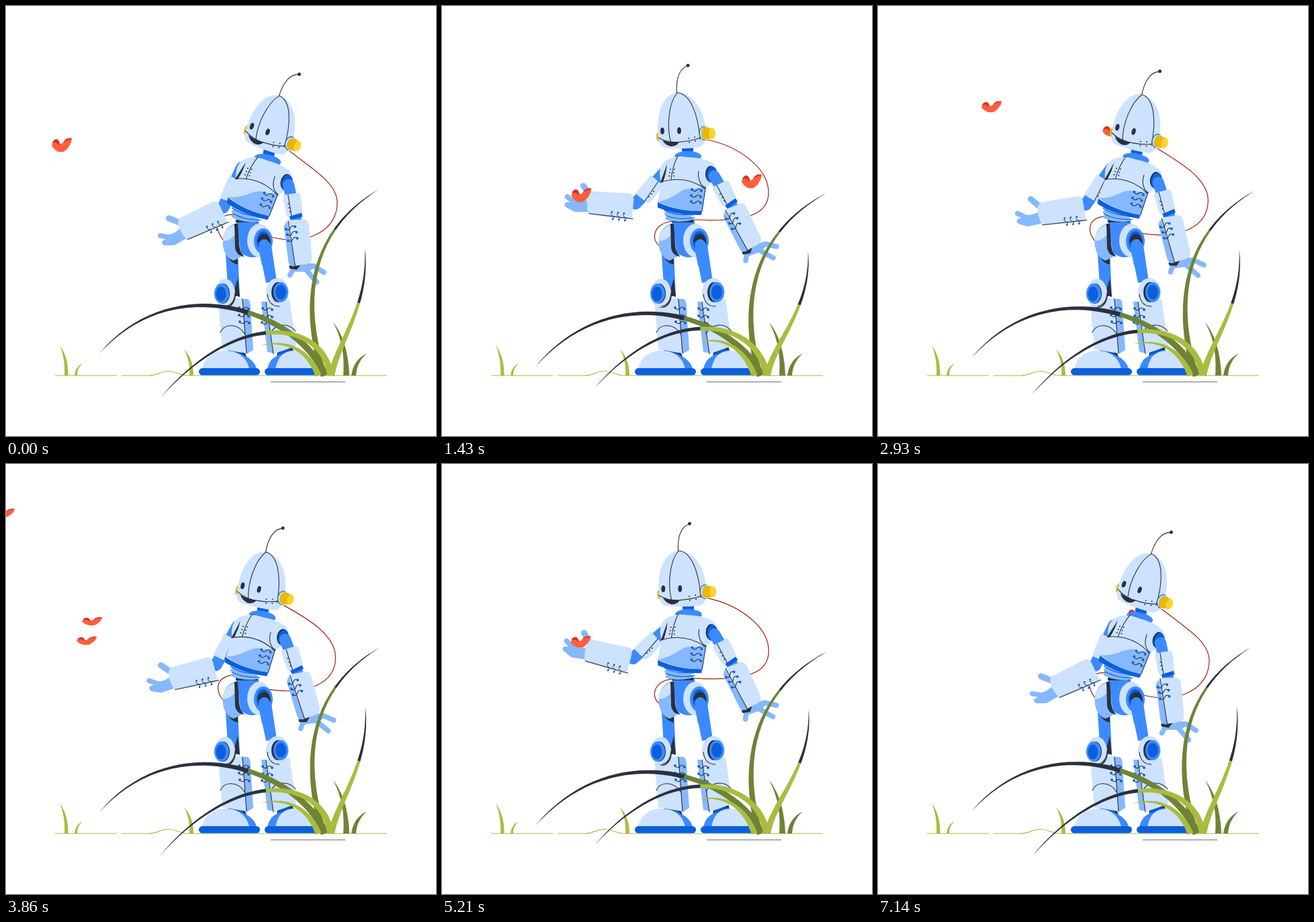
Write an HTML page that moves like this. It is 640x640 px and loops after 7.21 s.

```html
<!DOCTYPE html>
<html lang="en">
<head>
<meta charset="utf-8">
<title>Robot and butterflies</title>
<style>
  html, body { margin: 0; width: 100%; height: 100%; overflow: hidden; background: #fff; }
  svg { display: block; width: 100%; height: 100%; }
  .light { fill: #cce2ff; } .mid { fill: #85b8ff; } .blue { fill: #3c8aff; } .deep { fill: #0b5fdc; }
  .ink { fill: #2b303d; } .gold { fill: #e6b80b; } .sun { fill: #ffd22e; }
  .lime { fill: #a9bc40; } .moss { fill: #6f8336; }
  .line { fill: none; stroke: #2b303d; stroke-width: 1.1; stroke-linecap: round; }
  .arm { fill: none; stroke: #3c8aff; stroke-width: 18; stroke-linecap: round; }
  .finger { fill: none; stroke: #85b8ff; stroke-width: 7.5; stroke-linecap: round; stroke-linejoin: round; }
  .cord { fill: none; stroke: #a3200f; stroke-width: 1.2; }
  .soil { fill: none; stroke: #a9bc40; stroke-width: 1.2; }
</style>
</head>
<body>
<svg viewBox="0 0 640 640" xmlns="http://www.w3.org/2000/svg">
  <defs>
    <g id="lace">
      <path class="line" d="M-7 0q3 5 7 1t7 1"/>
      <circle class="deep" cx="-7" r="1.9"/><circle class="deep" cx="7" cy="2" r="1.9"/>
    </g>
    <g id="butterfly">
      <path fill="#d3361c" d="M-14 -3C-12 -10 -4 -11 -3 -2L1 1C2 -8 8 -11 15 -10L10 -2L-8 3Z"/>
      <path fill="#ff5f3f" d="M-15 0C-13 -5 -8 -5 -4 0C0 -1 4 -7 15 -9C15 -3 7 10 1 10C-6 11 -12 7 -15 0Z"/>
    </g>
  </defs>

  <g id="backFlights"></g>
  <path class="soil" d="M73 550H165M172 550H213C226 550 230 543 243 543.500C254 544 258 550 272 550H567"/>
  <path d="M394 559.500H505" stroke="#6b6f78" fill="none"/>
  <path class="lime" d="M87 550C88 532 85 517 80 505C89 517 93 533 92.500 550ZM102 550C103 541 107 535 114 532C108 537 106 543 106 550ZM273 550C274 534 271 522 265 511C275 521 279 535 279 550Z"/>
  <path id="cord" class="cord"/>
  <path id="cordLoop" class="cord"/>

  <g id="legs">
    <path class="blue" d="M326 355L345 368L348 432H331Z"/>
    <path class="ink" d="M328 369Q337 376 345 373L345 385Q333 382 328 369ZM345 405L348 433L338 430Z"/>
    <path class="ink" d="M331 502H350L358 522H331Z"/>
    <path class="deep" d="M330 512Q343 508 356 521L352 530H330Z"/>
    <path class="mid" d="M348 436H360Q364 438 364 450L368 512L358 518Z"/>
    <path class="light" d="M316 440L351 434L358 517L322 511Z"/>
    <path class="line" d="M352 436L358 517M319 486C325 471 346 473 355 488"/>
    <use href="#lace" x="354" y="449"/><use href="#lace" x="354" y="460"/><use href="#lace" x="355" y="470"/>
    <ellipse class="ink" cx="328" cy="429" rx="14" ry="20"/>
    <ellipse class="light" cx="326" cy="427" rx="15" ry="21"/>
    <path class="line" d="M327 447Q340 444 341 427"/>
    <ellipse class="ink" cx="323" cy="428" rx="10" ry="15"/>
    <ellipse class="blue" cx="321" cy="428" rx="11" ry="15"/>
    <ellipse class="deep" cx="320" cy="428.500" rx="7.500" ry="11"/>
    <path class="blue" d="M346 517Q369 524 373 540H350Z"/>
    <path class="light" d="M292 540C296 521 311 513 326 513C346 513 358 523 362 540Z"/>
    <rect class="deep" x="287" y="539" width="91" height="10.500" rx="5.200"/>

    <path class="blue" d="M374 350H394L403 410L387 412Z"/>
    <path class="ink" d="M403 506L426 502L428 517L404 522Z"/>
    <path class="deep" d="M403 519Q415 508 428 512L430 524H405Z"/>
    <path class="mid" d="M380 440H390L400 517L389 515Z"/>
    <path class="light" d="M387 441L422 437L432 506L398 518Z"/>
    <path class="line" d="M387 441L398 518M393 488C400 473 420 470 431 484"/>
    <use href="#lace" x="389" y="450"/><use href="#lace" x="389" y="461"/><use href="#lace" x="388" y="471"/>
    <ellipse class="light" cx="404" cy="426" rx="17" ry="21"/>
    <path class="line" d="M389 429Q391 447 407 447"/>
    <ellipse class="ink" cx="405" cy="426" rx="10" ry="15"/>
    <ellipse class="blue" cx="409" cy="426" rx="11" ry="15"/>
    <ellipse class="deep" cx="409" cy="426" rx="8" ry="11"/>
    <path class="blue" d="M389 540C393 523 404 518 418 518L425 540Z"/>
    <path class="light" d="M401 540C405 521 413 514 428 513C446 513 456 523 460 540Z"/>
    <rect class="deep" x="385" y="539" width="79" height="10.500" rx="5.200"/>

    <path class="mid" d="M341 324C326 328 321 343 323 358C325 369 331 377 339 379L354 371L346 326Z"/>
    <path class="light" d="M339 326C327 331 323 340 323 350Q334 350 343 338Z"/>
    <path class="blue" d="M342 318H376L378 372Q362 378 350 367Z"/>
    <path class="ink" d="M340 324H345L347 357Q349 369 355 373Q343 372 341 360Z"/>
    <path class="ink" d="M342 318H374V322H342Z"/>
    <ellipse class="light" cx="377" cy="349" rx="18" ry="25"/>
    <ellipse class="blue" cx="383" cy="350" rx="14" ry="19"/>
    <ellipse class="deep" cx="383" cy="350" rx="10" ry="15"/>
    <path class="ink" d="M374 352Q376 339 385 339Q394 341 394 354Q385 345 374 352Z"/>
    <path class="blue" d="M376 361Q376 347 385 347Q393 348 394 361L398 386H381Z"/>
  </g>

  <g id="coil">
    <ellipse class="mid" cx="353" cy="316" rx="21" ry="5"/>
    <ellipse class="mid" cx="354" cy="309" rx="23" ry="6"/>
    <ellipse class="mid" cx="354" cy="301" rx="24" ry="7"/>
    <path class="line" style="stroke:#0b5fdc" d="M331 304Q350 314 377 309M333 312Q352 319 376 315"/>
  </g>

  <g id="leftUpper">
    <path class="arm" d="M333 246L288 294"/>
    <path class="light" d="M311 252L328 266Q328 270 311 291Q308 295 304 292L290 281Q288 278 291 275Z"/>
    <path class="line" d="M322 261L302 290"/>
    <circle class="ink" cx="315" cy="276" r="1"/><circle class="ink" cx="312" cy="280" r="1"/><circle class="ink" cx="308" cy="284" r="1"/>
  </g>
  <g id="leftFore">
    <path class="finger" d="M220 303H198L187 297M218 297L197 293L186 284M186 296H212"/>
    <path class="finger" style="stroke-width:9" d="M220 281L210 268"/>
    <path class="mid" d="M219 289L205 291L198 305L220 307Z"/>
    <path class="light" d="M224 276L278 279Q285 280 285 288L283 312Q282 319 274 318L222 311Q217 310 216 302Q214 285 220 278Z"/>
    <path class="line" d="M218 309L284 317"/>
    <g class="laces"><use href="#lace" transform="translate(254 312) rotate(75) scale(.75)"/><use href="#lace" transform="translate(263 313) rotate(75) scale(.75)"/><use href="#lace" transform="translate(272 314) rotate(75) scale(.75)"/></g>
  </g>

  <g id="torso">
    <path class="blue" d="M357 207H374V224H357Z"/>
    <path class="deep" d="M357 211H374V216Q366 220 357 215Z"/>
    <ellipse class="blue" cx="366" cy="224" rx="20" ry="8"/>
    <path class="deep" d="M321 290Q355 298 388 300L386 311Q350 312 321 300Z"/>
    <path class="light" d="M337 228Q348 222 366 225Q388 226 397 231Q411 235 409 256L393 271L388 305Q350 306 321 292L326 262Q319 236 337 228Z"/>
    <path class="mid" d="M322 291C347 287 353 273 367 272Q382 273 392 268L387 305Q350 306 322 291Z"/>
    <path class="line" d="M326 262Q362 251 392 272L387 305M351 223Q343 239 341 258M382 246C380 257 385 268 393 271"/>
    <path class="ink" d="M335 235L325 263L329 262Q334 249 335 235Z"/>
    <g class="ink"><circle cx="346" cy="243" r="1"/><circle cx="345" cy="248" r="1"/><circle cx="345" cy="253" r="1"/><circle cx="340" cy="243" r="1"/><circle cx="339" cy="248" r="1"/><circle cx="338" cy="253" r="1"/></g>
    <use href="#lace" x="379" y="273"/><use href="#lace" x="378" y="282"/><use href="#lace" x="378" y="291"/>
    <ellipse class="ink" cx="400" cy="250" rx="8" ry="12"/>
    <ellipse class="deep" cx="402" cy="251" rx="8" ry="12"/>
  </g>

  <g id="rightUpper">
    <path class="arm" style="stroke-width:17" d="M405 253L432 298"/>
    <path class="deep" d="M421 297L437 286L440 291L425 301Z"/>
    <path class="light" d="M404 269L422 260Q425 259 427 262L438 285L420 298Q417 298 415 294L403 273Z"/>
    <path class="line" d="M409 267L424 295"/>
    <circle class="ink" cx="414" cy="280" r="1"/><circle class="ink" cx="417" cy="285" r="1"/><circle class="ink" cx="420" cy="290" r="1"/>
  </g>
  <g id="rightFore">
    <path class="finger" d="M462 360L481 354L498 358M468 361L482 369L493 375M454 366L452 379"/>
    <path class="mid" d="M449 364L470 350L482 358L474 366L457 372Z"/>
    <path class="ink" d="M446 366L462 359L459 368L448 370Z"/>
    <path class="light" d="M424 302L444 294Q450 293 453 299L474 343Q477 351 470 355L452 365Q446 367 443 361L419 314Q417 306 424 302Z"/>
    <path class="mid" d="M421 306L455 364Q447 368 443 361L419 314Z"/>
    <path class="line" d="M422 304L455 364"/>
    <use href="#lace" transform="translate(428 312) rotate(-42)"/><use href="#lace" transform="translate(433 319) rotate(-42)"/><use href="#lace" transform="translate(437 327) rotate(-42)"/>
  </g>

  <g id="head">
    <ellipse class="gold" cx="322.500" cy="194" rx="3.500" ry="7.500"/>
    <path class="light" d="M322 196C318 160 329 130 351 129C376 129 393 160 392 192Q392 206 384 210Q355 214 331 211Q323 209 322 196Z"/>
    <path class="line" d="M350 129C337 145 334 180 341 204M350 129C369 130 381 160 384 198M322 196Q338 205 358 202Q378 200 391 193"/>
    <path class="ink" d="M328 200Q341 204 353 202Q350 209 341 209Q332 207 328 200Z"/>
    <ellipse class="ink" cx="328" cy="186" rx="2.900" ry="5"/><ellipse class="ink" cx="353" cy="185.500" rx="2.900" ry="5"/>
    <g class="ink"><circle cx="367" cy="197" r="1"/><circle cx="376" cy="195" r="1"/><circle cx="368" cy="203" r="1"/><circle cx="377" cy="201" r="1"/></g>
    <ellipse class="light" cx="391" cy="189.500" rx="8" ry="11.500"/>
    <path class="line" style="stroke:#0b5fdc" d="M391 179Q383 180 383 190Q384 199 391 200"/>
    <path class="gold" d="M391 180L402 182V197L391 199Q386 198 386 190Q386 182 391 180Z"/>
    <ellipse class="sun" cx="402" cy="189.500" rx="5" ry="8"/>
    <path class="line" d="M349.500 129C348 105 355 92 366 89"/><circle class="ink" cx="366" cy="88.500" r="2.500"/>
  </g>

  <path class="moss" d="M502 550C504 520 500 495 487 471C503 490 510 520 511 550ZM514 550C516 535 523 524 537 517C526 527 522 537 521 550Z"/>
  <g id="grass"></g>
  <g id="frontFlights"></g>
</svg>
<script>
const LOOP = 7210, SWAY = LOOP / 2, FLAP = 286;
const byId = id => document.getElementById(id);
const mix = (a, b, k) => a + (b - a) * k;
const svgEl = (parent, tag, attrs) => {
  const el = document.createElementNS('http://www.w3.org/2000/svg', tag);
  for (const name in attrs) el.setAttribute(name, attrs[name]);
  return parent.appendChild(el);
};

// Smooth curve through [time, value] keys, without overshoot.
function curve(keys) {
  const slope = i => (keys[i + 1][1] - keys[i][1]) / (keys[i + 1][0] - keys[i][0]);
  const tangents = keys.map((_, i) => {
    if (!i || i === keys.length - 1) return 0;
    const a = slope(i - 1), b = slope(i);
    return a * b > 0 ? 2 * a * b / (a + b) : 0;
  });
  return t => {
    if (t <= keys[0][0]) return keys[0][1];
    const i = keys.findIndex(k => k[0] > t) - 1;
    if (i < 0) return keys[keys.length - 1][1];
    const h = keys[i + 1][0] - keys[i][0], u = (t - keys[i][0]) / h, v = 1 - u;
    return v * v * (1 + 2 * u) * keys[i][1] + u * u * (3 - 2 * u) * keys[i + 1][1]
      + h * u * v * (v * tangents[i] - u * tangents[i + 1]);
  };
}

const upright = curve([[0, 0], [70, .02], [255, .35], [750, .95], [1430, 1], [1605, .965], [2255, .88], [2930, .245], [3535, 0], [SWAY, 0]]);
const upperSwing = curve([[0, 113], [70, 113.5], [255, 117], [1430, 131], [1605, 137], [2255, 146], [2930, 123], [3535, 113], [SWAY, 113]]);
const foreSwing = curve([[0, 153], [70, 154], [255, 164], [1430, 183], [1605, 192], [2255, 203.5], [2930, 170], [3535, 153], [SWAY, 153]]);

const turn = ([x, y], deg) => {
  const a = deg * Math.PI / 180, c = Math.cos(a), s = Math.sin(a);
  return [x * c - y * s, x * s + y * c];
};
const add = (a, b) => [a[0] + b[0], a[1] + b[1]];
const place = (id, from, to, deg) =>
  byId(id).setAttribute('transform', `translate(${to}) rotate(${deg}) translate(${-from[0]} ${-from[1]})`);

const mixPath = (a, b, k) => {
  const ends = b.match(/\d+/g);
  let i = 0;
  return a.replace(/\d+/g, n => mix(+n, +ends[i++], k).toFixed(2));
};

function poseRobot(t) {
  const p = upright(t), lean = 13 * (1 - p);
  const waist = [354, 312], hip = [mix(358, 354, p), 312];
  const onTorso = pt => add(hip, turn([pt[0] - waist[0], pt[1] - waist[1]], lean));
  place('torso', waist, hip, lean);
  place('coil', waist, hip, lean * .7);
  place('head', [358.5, 191.5], [mix(392.5, 358.5, p), mix(195, 191.5, p)], 21 * (1 - p));

  const leftShoulder = onTorso([328, 248]), upper = upperSwing(t), fore = foreSwing(t);
  const leftElbow = add(leftShoulder, turn([62, 0], upper));
  place('leftUpper', [328, 248], leftShoulder, upper - 131);
  place('leftFore', [287, 295], leftElbow, fore - 183);

  const rightShoulder = onTorso([402, 250]), upperDrop = 19 * (1 - p ** .8);
  place('rightUpper', [402, 250], rightShoulder, upperDrop);
  place('rightFore', [434, 299], add(rightShoulder, turn([32, 49], upperDrop)), 20 * (1 - p ** .7));

  byId('cord').setAttribute('d', mixPath('M421 215C455 242 493 263 493 293C493 333 450 358 395 344', 'M394 199C440 208 486 240 486 278C486 312 450 322 374 318', p));
  byId('cordLoop').setAttribute('d', mixPath('M345 312C316 305 306 328 324 349', 'M345 320C312 323 311 350 325 358', p));
  return add(leftElbow, turn([-80, -13], fore - 183));
}

// Blades: centre-line control points at both ends of the sway, base width, colour, share before the dark tip.
const blades = [
  ['moss', 10, .76, [473, 550, 447, 470, 434, 345, 555, 273], [473, 550, 449, 470, 447, 348, 574, 279]],
  ['moss', 11, .44, [475, 550, 440, 460, 255, 385, 139, 517], [475, 550, 438, 466, 258, 400, 138, 540]],
  ['lime', 9, 1, [465, 550, 452, 518, 425, 495, 379, 505], [465, 550, 452, 514, 425, 491, 383, 499]],
  ['lime', 10, .53, [483, 550, 472, 468, 345, 450, 230, 583], [483, 550, 472, 468, 340, 438, 227, 567]],
  ['lime', 10, .64, [484, 550, 494, 500, 541, 445, 534, 362], [484, 550, 494, 500, 551, 450, 546, 366]]
].map(([tone, width, split, rest, bent]) => ({
  width, split, rest, bent,
  stem: svgEl(byId('grass'), 'path', { class: tone }),
  tip: svgEl(byId('grass'), 'path', { class: 'ink' })
}));

function bladePath(c, width, from, to) {
  const left = [], right = [], steps = 20;
  for (let i = 0; i <= steps; i++) {
    const u = mix(from, to, i / steps), v = 1 - u;
    const at = k => v ** 3 * c[k] + 3 * v * v * u * c[k + 2] + 3 * v * u * u * c[k + 4] + u ** 3 * c[k + 6];
    const dir = k => v * v * (c[k + 2] - c[k]) + 2 * v * u * (c[k + 4] - c[k + 2]) + u * u * (c[k + 6] - c[k + 4]);
    const dx = dir(0), dy = dir(1), half = width / 2 * (1 - u) ** .65 * (1 - .25 * u) / Math.hypot(dx, dy);
    left.push(`${(at(0) - dy * half).toFixed(2)} ${(at(1) + dx * half).toFixed(2)}`);
    right.unshift(`${(at(0) + dy * half).toFixed(2)} ${(at(1) - dx * half).toFixed(2)}`);
  }
  return 'M' + left.concat(right).join('L') + 'Z';
}

function swayGrass(t) {
  const k = (1 - Math.cos(t / SWAY * 2 * Math.PI)) / 2;
  for (const b of blades) {
    const c = b.rest.map((n, i) => mix(n, b.bent[i], k));
    b.stem.setAttribute('d', bladePath(c, b.width, 0, b.split));
    if (b.split < 1) b.tip.setAttribute('d', bladePath(c, b.width, b.split, 1));
  }
}

// Flights: [time, x, y] keys; `perch` is the time span spent on the hand.
const flights = [
  { layer: 'front', perch: [720, 1750], keys: [[0, 83, 207], [255, 128, 234], [720, 205, 279], [1750, 203, 265], [2300, 205, 195], [2930, 169, 150], [3860, -2, 73], [4000, -28, 62]] },
  { layer: 'front', perch: [4325, 6300], keys: [[3200, -25, 140], [3605, 83, 207], [3860, 128, 234], [4325, 205, 279], [6300, 215, 280]] },
  { layer: 'back', keys: [[560, 656, 362], [830, 587, 345], [1430, 461, 261], [2110, 390, 222], [2930, 349, 186], [3300, 225, 190], [3700, 112, 245], [3860, 120, 263], [3960, 146, 272], [4350, 262, 296]] },
  { layer: 'back', keys: [[5590, 656, 362], [5860, 587, 345], [6460, 461, 261], [LOOP, 385, 225]] },
  { layer: 'back', keys: [[6300, 215, 280], [6900, 360, 262], [LOOP, 365, 258]] }
].map(f => ({
  ...f, start: f.keys[0][0], end: f.keys[f.keys.length - 1][0],
  x: curve(f.keys.map(k => [k[0], k[1]])), y: curve(f.keys.map(k => [k[0], k[2]])),
  el: svgEl(byId(f.layer + 'Flights'), 'use', { href: '#butterfly' })
}));

function fly(t, hand) {
  const flap = .82 + .2 * Math.cos(t / FLAP * 2 * Math.PI);
  for (const f of flights) {
    const shown = t >= f.start && t < f.end;
    f.el.style.display = shown ? '' : 'none';
    if (!shown) continue;
    let x = f.x(t), y = f.y(t);
    if (f.perch) {
      const [land, leave] = f.perch;
      const hold = Math.max(0, Math.min(1, (t - land + 250) / 250, (leave + 250 - t) / 250));
      x = mix(x, hand[0], hold);
      y = mix(y, hand[1], hold);
    }
    f.el.setAttribute('transform', `translate(${x} ${y}) scale(1 ${flap})`);
  }
}

const begin = performance.now();
function draw() {
  const t = (performance.now() - begin) % LOOP, phase = t % SWAY;
  swayGrass(phase);
  fly(t, poseRobot(phase));
  requestAnimationFrame(draw);
}
draw();
</script>
</body>
</html>
```
